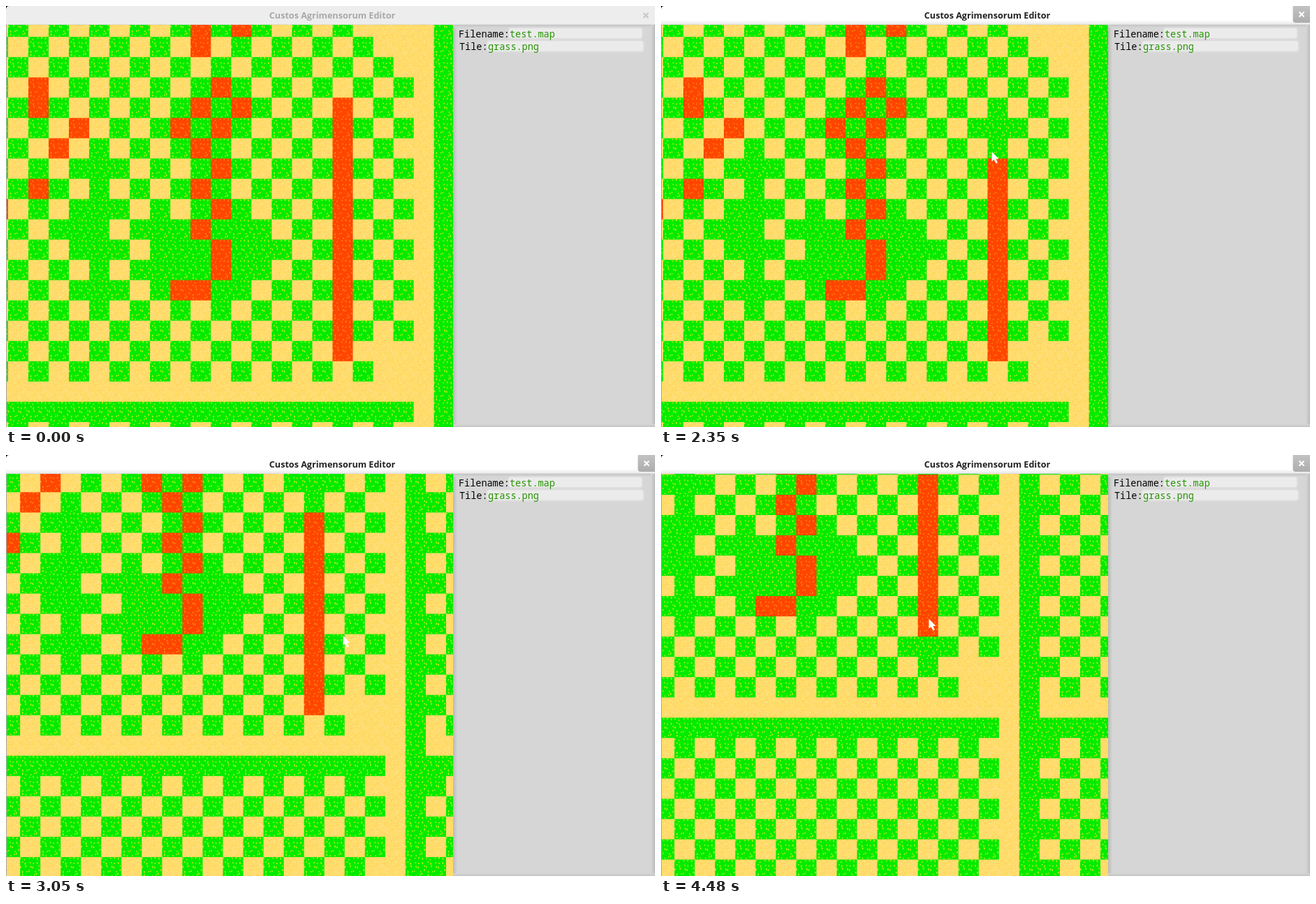
An HTML page with a canvas that plays this animation: 929 px wide and 603 px high, repeating every 4730 ms.

```html
<!DOCTYPE html>
<html lang="en">
<head>
<meta charset="utf-8">
<title>Map editor</title>
<style>
html, body { margin: 0; width: 100%; height: 100%; overflow: hidden; }
canvas { display: block; }
</style>
</head>
<body>
<canvas id="stage" width="929" height="603"></canvas>
<script>
const LOOP = 4730, TILE = 32, SCALE = 929 / 1024, SIZE = 28;
const ctx = document.getElementById('stage').getContext('2d');

const clamp = (v, lo, hi) => Math.max(lo, Math.min(hi, v));
const within = (v, lo, hi) => v >= lo && v <= hi;

function randomFrom(seed) {
  return () => (seed = seed * 16807 % 2147483647) / 2147483647;
}

function makeCanvas(size) {
  const c = document.createElement('canvas');
  c.width = c.height = size;
  return c.getContext('2d');
}

// A tile of one colour, textured by mark(g, random)
function makeTile(base, mark) {
  const g = makeCanvas(TILE);
  g.fillStyle = base;
  g.fillRect(0, 0, TILE, TILE);
  mark(g, randomFrom(11));
  return g.canvas;
}

// Small specks, one at a random place in each cell of a 5 x 5 grid
const specks = color => (g, random) => {
  g.fillStyle = color;
  for (let i = 0; i < 25; i++) {
    const x = i % 5 * 6.4 + random() * 4, y = Math.floor(i / 5) * 6.4 + random() * 4;
    g.fillRect(x | 0, y | 0, 2, 2 + random() * 2 | 0);
  }
};

const grains = (g, random) => {
  for (let i = 0; i < 150; i++) {
    g.fillStyle = i % 3 ? '#ffe69a' : '#ffd052';
    g.fillRect(random() * TILE | 0, random() * TILE | 0, 1 + i % 2, 1);
  }
};

const grass = makeTile('#00eb00', specks('#a4ee0c'));
const lava = makeTile('#ff4500', specks('#ff7c0c'));
const sand = makeTile('#ffdb67', grains);

// Time at which a cell of the lava wall, by row, is painted over with grass
const painted = { 3: 1300, 4: 1800, 5: 2350, 14: 4380, 15: 3910 };
// Single lava cells as column,row
const strayLava = new Set(
  '1,2 1,3 3,4 2,5 1,7 -1,8 9,-1 11,-1 9,0 11,3 8,4 10,11 8,12 9,12'.split(' '));

const isWall = (c, r) => c === 16 && within(r, 3, 15);
const isLava = (c, r) =>
  within(r, 2, 10) && c === 10 - r % 2 || strayLava.has(c + ',' + r);
const isMeadow = (c, r) =>
  Math.abs(c - 3.9) * 4 + Math.abs(r - 9) < 4 ||
  within(r, 9, 12) && within(c, 7, 12) && r + c < 24;
const isBeach = (c, r) =>
  c === 20 || r === 17 || within(c, 18, 19) && (r < 1 || within(r, 15, 16));

function tileAt(c, r, t) {
  if (isWall(c, r)) return t >= painted[r] ? grass : lava;
  if (isLava(c, r)) return lava;
  if (c === 21 || isMeadow(c, r)) return grass;
  if (isBeach(c, r)) return sand;
  return r === 18 || (r + c) % 2 ? grass : sand;
}

const map = makeCanvas(SIZE * TILE);

function drawMap(t) {
  for (let r = 0; r < SIZE; r++)
    for (let c = 0; c < SIZE; c++)
      map.drawImage(tileAt(c - 1, r - 1, t), c * TILE, r * TILE);

  // The view scrolls 15 map pixels every 50 ms
  const steps = start => clamp(Math.floor((t - start) / 50) + 1, 0, 7) * 15;
  const down = steps(2600) + steps(2950);
  const right = steps(2950) + (t >= 3300 ? 5 : 0);
  ctx.save();
  ctx.beginPath();
  ctx.rect(1, 27, 639, 576);
  ctx.clip();
  ctx.drawImage(map.canvas, -26.1 - right * SCALE, 15.2 - down * SCALE,
    SIZE * TILE * SCALE, SIZE * TILE * SCALE);
  ctx.restore();
}

function gradient(x0, y0, x1, y1, from, to) {
  const g = ctx.createLinearGradient(x0, y0, x1, y1);
  g.addColorStop(0, from);
  g.addColorStop(1, to);
  return g;
}

function rect(x, y, w, h, fill) {
  ctx.fillStyle = fill;
  ctx.fillRect(x, y, w, h);
}

function roundRect(x, y, w, h, radius, fill) {
  ctx.fillStyle = fill;
  ctx.beginPath();
  ctx.roundRect(x, y, w, h, radius);
  ctx.fill();
}

function text(str, x, y, font, fill, align = 'left') {
  ctx.font = font;
  ctx.fillStyle = fill;
  ctx.textAlign = align;
  ctx.fillText(str, x, y);
}

function drawTitle(active) {
  rect(0, 0, 929, 27, active ? '#fff' : '#ededed');
  if (active) rect(0, 20, 929, 7, gradient(0, 20, 0, 27, '#fff', '#e6e6e6'));
  rect(0, 26, 929, 1, '#dcdcdc');
  // Rounded window corner
  ctx.fillStyle = '#000';
  ctx.beginPath();
  ctx.moveTo(0, 0);
  ctx.lineTo(5, 0);
  ctx.quadraticCurveTo(0, 0, 0, 5);
  ctx.fill();
  text('Custos Agrimensorum Editor', 467, 17.5,
    'bold 12.6px "Open Sans", "Noto Sans", sans-serif', active ? '#222' : '#a8a8a8', 'center');

  if (active) roundRect(904.5, -4, 28, 28, 4, gradient(0, 0, 0, 24, '#c2c2c2', '#adadad'));
  const x = active ? 917 : 916, y = active ? 12 : 13.5;
  ctx.strokeStyle = active ? '#fff' : '#c6c6c6';
  ctx.lineWidth = 2;
  ctx.beginPath();
  for (const s of [-1, 1]) {
    ctx.moveTo(x - 3.5, y - 3.5 * s);
    ctx.lineTo(x + 3.5, y + 3.5 * s);
  }
  ctx.stroke();
}

function drawField(label, value, x, split, top, right) {
  ctx.save();
  ctx.shadowColor = '#ebebeb';
  ctx.shadowBlur = 4;
  roundRect(split, top + 2, right - split - 2, 14, 2, '#ebebeb');
  ctx.restore();
  const font = '13.5px "Noto Sans Mono", "DejaVu Sans Mono", monospace';
  text(label, x, top + 14.5, font, '#000');
  text(value, split + 1, top + 14.5, font, '#249400');
}

function drawPanel() {
  const face = '#d6d6d6';
  rect(640, 27, 289, 576, face);
  rect(640, 27, 6, 576, gradient(640, 0, 646, 0, '#b9b9b9', face));
  rect(640, 27, 289, 4, gradient(0, 27, 0, 31, '#c4c4c4', face));
  rect(923, 27, 6, 576, gradient(923, 0, 929, 0, face, '#bcbcbc'));
  rect(640, 599, 289, 4, gradient(0, 599, 0, 603, face, '#c2c2c2'));
  drawField('Filename:', 'test.map', 648, 720, 30, 912);
  drawField('Tile:', 'grass.png', 649, 689, 48.5, 914);
}

// Pointer path: time, x, y; each stretch slows down towards its end
const path = [
  [440, 842, 430], [940, 464, 197], [1040, 482, 174], [1500, 480, 152], [2000, 474, 198],
  [2350, 473, 208], [2600, 482, 258], [3200, 482, 258], [3400, 342, 258],
  [3700, 384, 300], [3910, 384, 300], [4160, 383, 282], [4380, 383, 281],
  [4480, 383, 234], [LOOP, 383, 234]
];
const arrow = new Path2D('M0 0V14L3 11.5 6 17 8.5 16 6 10.5H10Z');

function drawPointer(t) {
  const i = path.findIndex(p => p[0] > t);
  if (i < 1) return;
  const [t0, x0, y0] = path[i - 1], [t1, x1, y1] = path[i];
  const k = Math.floor((t - t0) / 50) * 50 / (t1 - t0);
  const ease = k * (1.5 - k / 2);
  ctx.save();
  ctx.translate(x0 + (x1 - x0) * ease + 0.5, y0 + (y1 - y0) * ease + 0.5);
  ctx.fillStyle = '#fff';
  ctx.fill(arrow);
  ctx.restore();
}

function frame() {
  const t = performance.now() % LOOP;
  rect(0, 27, 1, 576, '#a9a9a9');
  drawMap(t);
  drawPanel();
  drawTitle(t >= 1300);
  drawPointer(t);
  requestAnimationFrame(frame);
}
frame();
</script>
</body>
</html>
```
